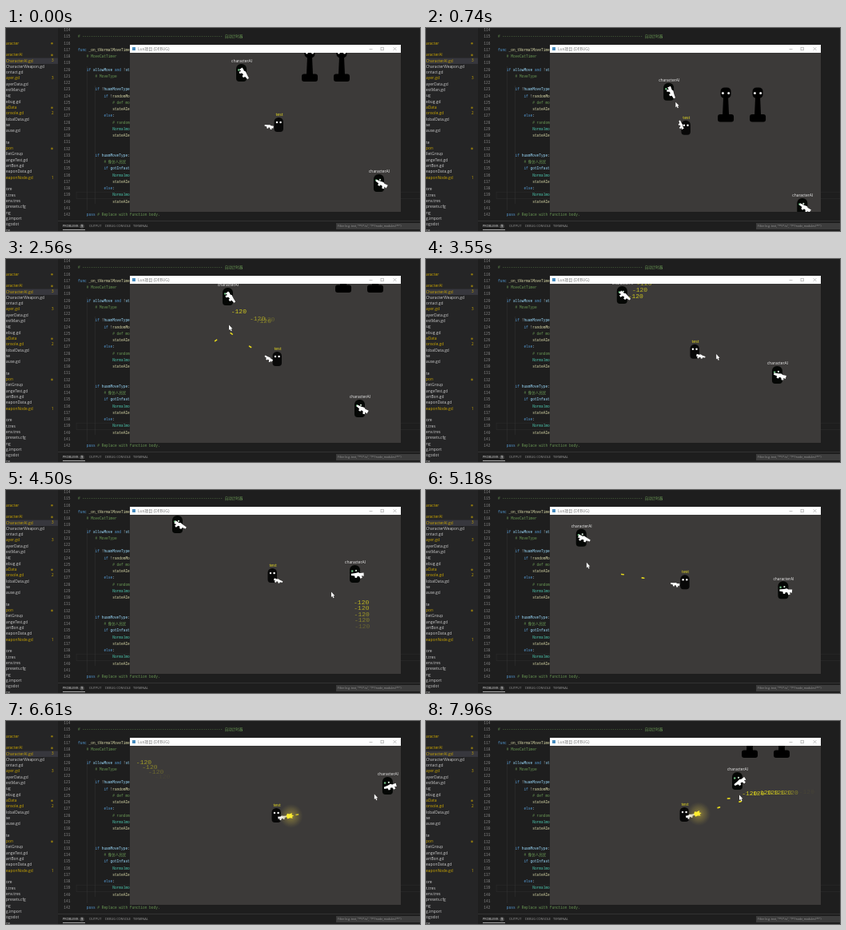
Write an HTML page with a canvas that moves like this. It is 518 px wide and 254 px high and loops after 8000 ms.

```html
<!DOCTYPE html>
<html lang="en">
<head>
<meta charset="utf-8">
<style>
html, body { margin: 0; width: 100%; height: 100%; overflow: hidden; background: #1e1e1e; }
canvas { display: block; width: 518px; height: 254px; }
</style>
</head>
<body>
<canvas id="stage"></canvas>
<script>
const W = 518, H = 254, LOOP = 8000;
const canvas = document.getElementById('stage');
const ctx = canvas.getContext('2d');
const dpr = window.devicePixelRatio || 1;
canvas.width = W * dpr;
canvas.height = H * dpr;

const MONO = '"Liberation Mono", "Noto Sans CJK SC", "Noto Sans CJK", monospace';
const SANS = '"Open Sans", "Noto Sans CJK SC", "Noto Sans CJK", sans-serif';
const COLORS = { k: '#569cd6', c: '#6a9955', f: '#dcdcaa', v: '#9cdcfe', t: '#4ec9b0', w: '#d4d4d4' };

// line number, indent, then pieces as "colour:text"
const CODE = [
  [115, 0, 'c:# ' + '-'.repeat(65) + ' 自动计时器'],
  [117, 0, 'k:func ', 'f:_on_tNormalMoveTimer'],
  [118, 1, 'c:# MoveCatTimer'],
  [120, 1, 'k:if ', 'v:allowMove ', 'k:and ', 'w:!', 'v:st'],
  [121, 2, 'c:# MoveType'],
  [123, 2, 'k:if ', 'w:!', 'v:huamMoveType'],
  [124, 3, 'k:if ', 'w:!', 'f:randomMov'],
  [125, 4, 'c:# def mov'],
  [126, 4, 'f:stateAIec'],
  [127, 3, 'k:else', 'w::'],
  [128, 4, 'c:# random'],
  [129, 4, 't:Normalmov'],
  [130, 4, 'f:stateAIec'],
  [133, 2, 'k:if ', 'v:huamMoveType', 'w::'],
  [134, 3, 'c:# 像仿人高优'],
  [135, 3, 'k:if ', 'v:gotInfast'],
  [136, 4, 't:Normalmov'],
  [137, 4, 'f:stateAIec'],
  [138, 3, 'k:else', 'w::'],
  [139, 4, 't:Normalmov'],
  [140, 4, 'f:stateAIec'],
  [142, 1, 'k:pass ', 'c:# Replace with function body.']
];

// a trailing mark (* or a count) flags a yellow entry
const FILES = ['aracter|*', '', 'aracterAI|*', 'CharacterAI.gd|3', 'CharacterWeapon.gd', 'ontact.gd', 'ayer.gd|3',
  'ayerData.gd', 'estMan.gd', 'ug', 'ebug.gd', 'aData|*', 'onsole.gd|2', 'lobalData.gd', 'se', 'ause.gd', '',
  'te', 'pon|*', 'lletGroup', 'angeTest.gd', 'artBon.gd', 'eaponData.gd', 'eaponNode.gd|1', '', 'ore',
  't.tres', 'env.tres', 'presets.cfg', 'ng', 'g.import', 'ogodot', 'ce'];

// time, then x and y of the player and both enemies
const POSES = [
  [0, 341, 121, 294, 56, 466, 194],
  [1380, 311, 128, 311, 100, 474, 250],
  [2560, 339, 125, 277, 47, 442, 187],
  [4500, 333, 107, 214, 43, 436, 105],
  [5810, 315, 123, 175, 75, 456, 144],
  [6610, 338, 118, 130, 10, 477, 81],
  [7960, 323, 117, 100, 0, 389, 75]
];
const MOUSE = [[0, 270, 105], [800, 314, 96], [1380, 318, 98], [2560, 280, 86], [3300, 268, 84], [3700, 408, 140],
  [4500, 408, 131], [4980, 205, 95], [5810, 184, 90], [6500, 463, 95], [7960, 393, 96]];
// where the first statue stands as the camera scrolls
const WORLD = [[0, 380, 63], [750, 375, 114], [1380, 391, 91], [2050, 399, 46], [2560, 422, 38], [3700, 450, -62],
  [4500, 450, -30], [4980, 402, -32], [6610, 446, -62], [7150, 365, 48], [7960, 405, 42]];
const BURSTS = [[750, 1400], [1873, 2060], [2323, 2520], [2830, 3200], [3700, 4100], [4980, 5130], [5360, 5880],
  [6575, 7000], [7150, 7970]];
const SHOT_GAP = 90, SPEED = 0.3, FLASH = 50, BOUNCE = 240, HIT_LIFE = 720;

const linear = u => u;
const smooth = u => u * u * (3 - 2 * u);

function rand(n) {
  const v = Math.sin(n * 12.9898) * 43758.5453;
  return v - Math.floor(v);
}

function at(track, t, ease = linear) {
  const next = track.findIndex(k => k[0] > t);
  if (next < 1) return track[next < 0 ? track.length - 1 : 0].slice(1);
  const a = track[next - 1], b = track[next], u = ease((t - a[0]) / (b[0] - a[0]));
  return a.slice(1).map((v, j) => v + (b[j + 1] - v) * u);
}

const playerAt = t => at(POSES, t).slice(0, 2);
const enemiesAt = t => {
  const p = at(POSES, t);
  return [p.slice(2, 4), p.slice(4, 6)];
};
const mouseAt = t => at(MOUSE, t, smooth);
const dist = (a, b) => Math.hypot(a[0] - b[0], a[1] - b[1]);

function rect(x, y, w, h, color) {
  ctx.fillStyle = color;
  ctx.fillRect(x, y, w, h);
}

function text(s, x, y, size, color, family = SANS, align = 'left') {
  ctx.font = size + 'px ' + family;
  ctx.textAlign = align;
  ctx.textBaseline = 'middle';
  ctx.fillStyle = color;
  ctx.fillText(s, x, y);
}

function round(x, y, w, h, r, color) {
  ctx.fillStyle = color;
  ctx.beginPath();
  ctx.roundRect(x, y, w, h, r);
  ctx.fill();
}

function dot(x, y, r, color) {
  ctx.fillStyle = color;
  ctx.beginPath();
  ctx.arc(x, y, r, 0, 7);
  ctx.fill();
}

function poly(points, color) {
  ctx.fillStyle = color;
  ctx.beginPath();
  points.forEach(p => ctx.lineTo(p[0], p[1]));
  ctx.closePath();
  ctx.fill();
}

function placed(x, y, angle, draw) {
  ctx.save();
  ctx.translate(x, y);
  ctx.rotate(angle);
  draw();
  ctx.restore();
}

const lineY = n => 3 + (n - 114) * 8.25;

function drawEditor() {
  rect(0, 0, W, H, '#1e1e1e');
  rect(0, 0, 65, H, '#252526');
  rect(0, 37.5, 65, 7.4, '#37373d');
  FILES.forEach((entry, i) => {
    const [name, mark] = entry.split('|'), y = 19.3 + i * 7.31;
    text(name, 0, y, 4.9, mark ? '#cca700' : '#cccccc');
    if (mark === '*') dot(57.5, y, 1.3, '#8a7410');
    else if (mark) text(mark, 57, y, 4.6, '#cca700');
  });
  ctx.strokeStyle = '#282828';
  ctx.lineWidth = 0.8;
  ctx.strokeRect(88, lineY(139) - 4, W, 8.2);
  for (let n = 114; n <= 142; n++) text(n, 72.3, lineY(n), 4.5, '#858585', MONO);
  rect(101, 48, 0.5, 180, '#333333');
  rect(111.5, 72, 0.5, 148, '#333333');
  for (const [n, indent, ...parts] of CODE) {
    let x = 90 + indent * 10.8;
    for (const part of parts) {
      const s = part.slice(2);
      text(s, x, lineY(n), 4.5, COLORS[part[0]], MONO);
      x += ctx.measureText(s).width;
    }
  }
  rect(65, 241, W - 65, 0.6, '#414141');
  text('PROBLEMS', 71, 248, 3.8, '#e7e7e7');
  rect(71, 252.3, 28, 0.7, '#e7e7e7');
  dot(95, 248, 2.8, '#4d4d4d');
  text('9', 95, 248, 3.8, '#ffffff', SANS, 'center');
  text('OUTPUT', 104, 248, 3.9, '#999999');
  text('DEBUG CONSOLE', 124, 248, 3.9, '#999999');
  text('TERMINAL', 159, 248, 3.9, '#999999');
  rect(413, 244, 105, 8, '#3c3c3c');
  text('Filter (e.g. text, "**/*.ts", "!**/node_modules/**")', 415, 248, 3.5, '#9a9a9a');
}

function drawWindow() {
  rect(155, 21, 339, 209, '#3c3a39');
  rect(155, 21, 339, 10, '#ffffff');
  rect(158, 24, 4, 4, '#478cbf');
  text('Lux项目 (DEBUG)', 165, 26.2, 5, '#777777');
  rect(454.5, 26, 4, 0.5, '#888888');
  ctx.strokeStyle = '#888888';
  ctx.lineWidth = 0.5;
  ctx.strokeRect(469, 24.2, 3.6, 3.6);
  ctx.beginPath();
  ctx.moveTo(484.5, 24); ctx.lineTo(488.5, 28);
  ctx.moveTo(488.5, 24); ctx.lineTo(484.5, 28);
  ctx.stroke();
}

function drawGun(x, y, angle, scale) {
  placed(x, y, angle, () => {
    ctx.scale(scale, Math.cos(angle) < 0 ? -scale : scale);
    poly([[-8, -2.5], [-3, -2], [-1, -3.2], [3, -2.2], [8.5, -1.5], [8.5, 0.9], [4, 1.4], [3.5, 4], [1, 4],
      [0.5, 1.8], [-2, 2], [-3.5, 5], [-6, 4], [-5, 1.4], [-8, 2]], '#ffffff');
  });
}

function drawStatue(x, base) {
  round(x - 6.5, base - 39, 13, 13.5, 5, '#000');
  poly([[x - 3, base - 27], [x + 3, base - 27], [x + 4, base - 5], [x - 4, base - 5]], '#000');
  round(x - 10, base - 5.5, 20, 9.5, 3, '#000');
  for (const s of [-1, 1]) dot(x + s * 3.6, base - 32, 1.5, '#e8e8e8');
}

// enemies keep their guns on the player
function drawEnemy([x, y], player) {
  round(x - 6, y - 11, 13, 22, [6, 6, 4, 4], '#050705');
  dot(x - 2.8, y - 3.5, 1.2, '#6fbf83');
  dot(x + 2, y - 4.2, 1.1, '#d6e8d8');
  drawGun(x + 4, y + 1, Math.atan2(player[1] - y, player[0] - x), 0.95);
  text('characterAI', x + 1, y - 14, 4.9, '#f0f0f0', SANS, 'center');
}

function aim(t) {
  const player = playerAt(t), mouse = mouseAt(t);
  const angle = Math.atan2(mouse[1] - player[1], mouse[0] - player[0]);
  const cos = Math.cos(angle), sin = Math.sin(angle);
  const gun = [player[0] - 2 + 10 * cos, player[1] + 4 + 8 * sin];
  const muzzle = [gun[0] + 9 * cos, gun[1] + 9 * sin];
  return { player, mouse, angle, gun, muzzle };
}

function drawPlayer({ player: [x, y], gun, angle }) {
  round(x - 5.5, y - 9, 11.5, 18, [5.5, 5.5, 4, 4], '#080808');
  dot(x - 2, y - 3, 1.2, '#fff');
  dot(x + 2.6, y - 3, 1.2, '#fff');
  drawGun(gun[0], gun[1], angle, 0.68);
  text('test', x + 1, y - 12.5, 5.2, '#f0e420', SANS, 'center');
}

function drawBullet([x, y], angle, d) {
  placed(x, y, angle, () => round(d - 2, -0.8, 4, 1.6, 0.7, '#e6d91c'));
}

function drawFlash({ muzzle: [x, y], angle }) {
  const glow = ctx.createRadialGradient(x + 2, y, 1, x + 2, y, 15);
  glow.addColorStop(0, 'rgba(190,170,60,.6)');
  glow.addColorStop(0.6, 'rgba(150,135,65,.3)');
  glow.addColorStop(1, 'rgba(120,110,60,0)');
  dot(x + 2, y, 15, glow);
  placed(x, y, angle, () => poly([[-4, -1], [-2, -3.5], [0, -2.5], [4, -3], [3, -0.8], [5.5, 0.6], [3, 1.5],
    [3.5, 3.5], [0, 2.4], [-3, 3]], '#ffee30'));
}

// damage stays in the world where the enemy was struck
function drawHit(t, hit, mouse) {
  const age = t - hit;
  if (age < 0 || age > HIT_LIFE) return;
  const [x, y] = enemiesAt(hit).sort((a, b) => dist(a, mouse) - dist(b, mouse))[0];
  const now = at(WORLD, t), then = at(WORLD, hit);
  ctx.globalAlpha = 1 - (age / HIT_LIFE) ** 2;
  text('-120', x + 8 + now[0] - then[0], y + 16 + now[1] - then[1], 8, '#d2ca1e', MONO, 'center');
  ctx.globalAlpha = 1;
}

// a shot flies to the mouse, scores there and sometimes ricochets
function drawShot(t, fired) {
  const shot = aim(fired), age = t - fired;
  const travel = dist(shot.mouse, shot.muzzle) / SPEED;
  const after = age - travel;
  if (age < travel) {
    if (age > 20) drawBullet(shot.muzzle, shot.angle, age * SPEED);
  } else if (after < BOUNCE && rand(fired) < 0.4) {
    drawBullet(shot.mouse, rand(fired + 1) * Math.PI * 2, after * SPEED);
  }
  if (age < FLASH) drawFlash(aim(t));
  drawHit(t, fired + travel, shot.mouse);
}

function drawShots(t) {
  for (const [from, to] of BURSTS)
    for (let s = from; s <= to && s <= t; s += SHOT_GAP) drawShot(t, s);
}

function drawCursor([x, y]) {
  const shape = [[0, -3.5], [0, 3], [1.4, 1.8], [2.5, 4.2], [3.6, 3.7], [2.5, 1.4], [4.3, 1.2]];
  poly(shape.map(p => [x + p[0] - 1, y + p[1]]), '#ffffff');
}

// the upper wall, and an enemy beneath it, dip into view once
function drawWall(t, player) {
  const edge = 39 - 12 * (Math.abs(t - 1300) / 350) ** 2;
  if (edge < 20) return;
  drawEnemy([322, edge + 1], player);
  rect(155, edge - 20, 182, 19, '#5a4f18');
  rect(155, edge - 1, 126, 1, '#5a4f18');
  rect(231, edge - 9, 15, 8.5, '#d5dbdc');
  rect(232.5, edge - 8, 12, 6, '#78898c');
}

function drawGame(t) {
  const state = aim(t), [sx, sy] = at(WORLD, t);
  ctx.save();
  ctx.beginPath();
  ctx.rect(155, 31, 339, 199);
  ctx.clip();
  drawStatue(sx, sy);
  drawStatue(sx + 40, sy);
  drawWall(t, state.player);
  enemiesAt(t).forEach(e => drawEnemy(e, state.player));
  drawPlayer(state);
  drawShots(t);
  if (t > 120) drawCursor(state.mouse);
  ctx.restore();
}

const start = performance.now();
function frame() {
  const t = (performance.now() - start) % LOOP;
  ctx.setTransform(dpr, 0, 0, dpr, 0, 0);
  drawEditor();
  drawWindow();
  drawGame(t);
  requestAnimationFrame(frame);
}
frame();
</script>
</body>
</html>
```
